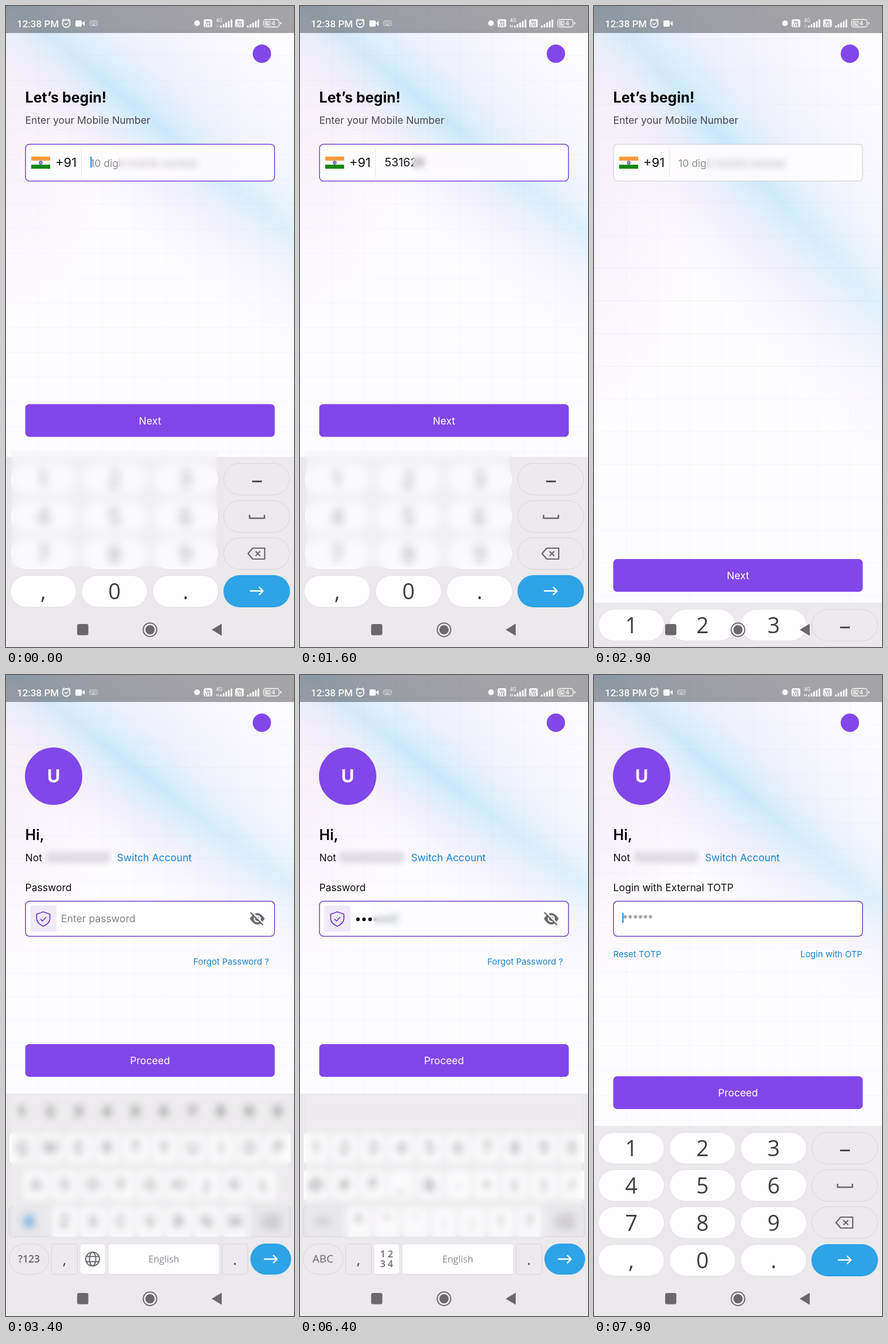
Recreate the animation shown at these times as an HTML page. Size 502x1115 px, loop 8 s.

```html
<!DOCTYPE html>
<html lang="en">
<head>
<meta charset="utf-8">
<title>Sign in</title>
<style>
  html, body { margin: 0; width: 100%; height: 100%; overflow: hidden; background: #fdfcff; }
  #stage { position: relative; width: 502px; height: 1115px; overflow: hidden; background: #fdfcff; }
  #stage > * { position: absolute; left: 0; top: 0; }
  #bg {
    width: 502px; height: 784px; transform-origin: 0 0;
    background:
      repeating-linear-gradient(90deg, rgba(110,90,170,.045) 0 1px, transparent 1px 55.7px),
      repeating-linear-gradient(rgba(110,90,170,.045) 0 1px, transparent 1px 43px),
      linear-gradient(100deg, transparent 45%, rgba(253,252,255,.55) 100%),
      radial-gradient(190px 330px at 0 230px, rgba(246,238,248,.8), transparent),
      linear-gradient(39deg, #fdfcff 48%, #f8f6fe 54%, #f1effd 59%, #e0effc 62.5%, #c9e8fb 66.5%, #dceffc 70%, #f0f1fe 75%, #f6f5fe 83%, #fcfbff 93%);
  }
  .blur {
    -webkit-mask: linear-gradient(90deg, transparent, #000 5px calc(100% - 5px), transparent),
          linear-gradient(transparent, #000 5px calc(100% - 5px), transparent);
    -webkit-mask-composite: source-in;
    mask-composite: intersect;
  }
</style>
</head>
<body>
<div id="stage">
  <div id="bg"></div>
  <svg id="app" width="502" height="1115"></svg>
  <div id="veils"></div>
  <svg id="nav" width="502" height="1115"></svg>
</div>
<script>
const LOOP = 8000, STEP = 100;
const PURPLE = '#8247e8', LINK = '#1c84cf', INK = '#3f3d41', GREY = '#6b686c';
const INTER = 'Inter, sans-serif', KEYFONT = "'Open Sans', sans-serif";
const NUMBER = '5316280497', SECRET = 'kuy@4827';
const TYPED = [3900, 4400, 4800, 5200, 5600, 6000, 6400, 6700];
const $ = id => document.getElementById(id);

// time, keyboard top, button top, background height
const LAYOUT = [
  [0, 784, 692.5, 784], [2800, 860, 780, 880], [2900, 1038, 962, 1038],
  [3000, 1115, 982, 1068], [3200, 860, 780, 880], [3300, 728, 642, 728],
  [7800, 784, 698, 784]
];
const SIGNAL = [[1000, 1800], [3200, 3700], [6300, 6900], [7900, 8000]];
const within = (t, a, b) => t >= a && t < b;

const esc = s => s.replace(/&/g, '&amp;').replace(/</g, '&lt;');
const text = (x, y, s, size, fill, o = {}) =>
  `<text x="${x}" y="${y}" font-size="${size}" fill="${fill}" font-family="${o.font || INTER}"` +
  ` font-weight="${o.w || 400}" text-anchor="${o.a || 'start'}">${esc(s)}</text>`;
const rect = (x, y, w, h, r, fill, stroke = 'none', sw = 1) =>
  `<rect x="${x}" y="${y}" width="${w}" height="${h}" rx="${r}" fill="${fill}" stroke="${stroke}" stroke-width="${sw}"/>`;
const circle = (x, y, r, fill, stroke = 'none', sw = 1) =>
  `<circle cx="${x}" cy="${y}" r="${r}" fill="${fill}" stroke="${stroke}" stroke-width="${sw}"/>`;
const line = (d, stroke, sw = 2) =>
  `<path d="${d}" fill="none" stroke="${stroke}" stroke-width="${sw}" stroke-linejoin="round"/>`;
const fillPath = (d, fill) => `<path d="${d}" fill="${fill}"/>`;
const glyph = (x, y, s, size, w = 400, fill = INK) => text(x, y, s, size, fill, { font: KEYFONT, a: 'middle', w });

function statusBar(t) {
  const white = '#fafafa';
  const badge = x => rect(x, 23, 15, 14, 3, white) +
    text(x + 7.5, 29.5, 'Vo', 6.5, '#8b8b8e', { w: 700, a: 'middle' }) +
    text(x + 7.5, 35.5, 'LTE', 6, '#8b8b8e', { w: 700, a: 'middle' });
  const bars = x => [0, 1, 2, 3, 4].map(i => rect(x + i * 4.6, 34 - i * 2.6, 3, 3.5 + i * 2.6, 1, white)).join('');
  const busy = SIGNAL.some(([a, b]) => within(t, a, b)) ? 1 : .4;
  let s = rect(0, 0, 502, 47, 0, 'rgba(0,0,0,.35)') +
    text(19, 36.5, '12:38 PM', 17, white, { font: 'Roboto, sans-serif', w: 500 }) +
    circle(105, 30.5, 6.5, 'none', white, 1.8) +
    line('M97.5 26l4-4M112.5 26l-4-4M102 30l2.5 2.5 4-3.5', white, 1.6) +
    rect(121, 25, 11, 11, 2, white) + fillPath('M132 30l5-4v9z', white) +
    circle(333, 30, 5, white) + badge(344.5) +
    text(366, 28, '4G', 9, white, { font: 'Roboto, sans-serif' }) +
    `<g opacity="${busy}">` + line('M367 37v-4M370 33v4', white, 1.4) + '</g>' +
    bars(373) + badge(399.5) + bars(420) +
    rect(449, 23.5, 27, 13, 4, 'none', white, 1.4) + rect(451, 25.5, 6, 9, 2, 'rgba(255,255,255,.55)') +
    rect(478, 28, 2, 4, 1, white) + text(462.5, 34, '24', 11, white, { a: 'middle', w: 500 });
  if (!within(t, 2800, 3300)) {
    s += `<g opacity=".8">` + rect(146, 26, 13, 8, 1.5, 'none', white, 1) +
      line('M148 28.5h9M148 30.5h9', white, 1).replace('/>', ' stroke-dasharray="1.4 1"/>') +
      line('M150 32.3h5', white, 1) + '</g>';
  }
  return s;
}

const caret = (x, y, h) => rect(x, y, 2.6, h, 0, '#2f9bea');
const button = (y, label) => rect(33.5, y, 435, 57, 7, PURPLE) +
  text(251, y + 35, label, 17.6, '#fff', { a: 'middle' });

function phonePage(t, btn) {
  const focus = t < 2800;
  const count = focus ? Math.min(10, Math.max(0, Math.floor((t - 100) / 250))) : 0;
  return text(33.5, 168, 'Let’s begin!', 25, '#000', { w: 700 }) +
    text(33.5, 205, 'Enter your Mobile Number', 17.6, '#4b4951') +
    rect(34, 240.5, 434, 64, 7, 'rgba(254,253,255,.9)', focus ? '#7a42d6' : '#d9d7dd', 1.5) +
    rect(44, 262, 33, 7, 0, '#ff9a3d') + rect(44, 269, 33, 7, 0, '#fff') + rect(44, 276, 33, 7, 0, '#138808') +
    circle(60.5, 272.5, 2.8, '#8f9bd0', '#23388f', 1) +
    text(86, 280, '+91', 22, '#111') + rect(131, 248, 1, 50, 0, '#e6e4ea') +
    (focus && !count ? caret(147, 262, 19) : '') +
    (count ? text(147.5, 279, NUMBER.slice(0, count), 20, '#151417')
           : text(147, 279.5, '10 digit mobile number', 17.6, '#8f8d93')) +
    button(btn, 'Next');
}

const greeting = () => circle(83, 176, 50, PURPLE) +
  text(83, 187, 'U', 31, '#fff', { w: 700, a: 'middle' }) +
  text(33.5, 287, 'Hi,', 25, '#000', { w: 600 }) +
  text(33.5, 324, 'Not', 17.6, '#111') +
  `<g filter="url(#soft)">${rect(70, 307, 111, 20, 4, '#dfdde3')}</g>` +
  text(193.5, 324, 'Switch Account', 17.6, LINK);
const field = () => rect(34, 393.5, 434, 61, 7, '#fefdff', '#6f43c4', 1.5);

function passwordPage(t, btn) {
  const count = TYPED.filter(s => t >= s).length;
  const open = count && t < TYPED[count - 1] + 300;
  const dots = open ? count - 1 : count;
  let entry = '';
  for (let i = 0; i < dots; i++) entry += circle(101 + i * 10.6, 425, 3.2, '#111');
  const end = 95.5 + dots * 10.6;
  if (open) entry += text(end, 430, SECRET[count - 1], 17.6, '#111', { font: 'Roboto, sans-serif' });
  if (open) entry += `<g opacity=".45">${caret(end + 10, 413, 20)}</g>`;
  return greeting() + text(33.5, 376, 'Password', 17.5, '#111') + field() +
    rect(42, 401, 46, 46, 4, '#f0eafb') +
    line('M65 412l11.5 4v8c0 6-5 10-11.5 13c-6.500-3-11.500-7-11.500-13v-8z', '#7339cf', 1.8) +
    line('M60 424.500l3.700 3.500 6.500-7', '#7339cf', 1.8) +
    (count ? entry : text(96, 430, 'Enter password', 17.6, '#85838a')) +
    fillPath('M425 424q13-20 26 0q-13 20-26 0z', '#6a686c') + circle(438, 424, 5, '#6a686c', '#fefdff', 2.4) +
    line('M427.500 411.500l22 22', '#fefdff', 3) + line('M426 413l22 22', '#6a686c', 2.4) +
    text(458.5, 504, 'Forgot Password ?', 15.1, LINK, { a: 'end' }) + button(btn, 'Proceed');
}

const totpPage = (t, btn) => greeting() + text(33.5, 376, 'Login with External TOTP', 17.6, '#111') + field() +
  text(50, 430, '******', 17.6, '#85838a') + (t >= 7900 ? caret(49, 414, 17) : '') +
  text(33.5, 491, 'Reset TOTP', 15.1, LINK) +
  text(468, 491, 'Login with OTP', 15.1, LINK, { a: 'end' }) + button(btn, 'Proceed');

const panel = top => rect(0, top, 502, 420, 0, '#ebe9eb');
const key = (x, y, w, h, r, fill) =>
  rect(x + .5, y + .5, w - 1, h - 1, r, fill, fill === '#fefdff' ? '#e1dfe3' : '#d5d3d6');
const arrow = (x, y) => line(`M${x - 12} ${y}h23M${x + 4} ${y - 7}l7 7-7 7`, '#fff', 2.4);
const erase = (x, y) => line(`M${x - 15} ${y}l8-9.500h21v19h-21z`, GREY, 2.2) +
  line(`M${x - 2} ${y - 4}l8 8m0-8l-8 8`, GREY, 2.2);

function keypad(t) {
  const at = t < 2600 && t >= 350 && t % 250 < STEP ? NUMBER[Math.floor((t - 350) / 250)] : '';
  let s = panel(784);
  ['123', '456', '789', ',0.'].forEach((row, j) => {
    const y = [795, 860, 924.5, 990][j];
    [...row].forEach((c, i) => {
      s += key(7 + i * 124, y, 116, 56, 28, c === at ? '#dedce0' : '#fefdff') + glyph(65 + i * 124, y + 42, c, 38);
    });
    s += j < 3 ? key(379, y, 116, 56, 28, '#ebe9ec') : rect(379, y, 116, 56, 28, '#2ea3e6');
  });
  return s + line('M429 827h17', INK, 2.8) + line('M424.500 885v6h26v-6', GREY, 2.6) + erase(437, 952.5) + arrow(437, 1017.5);
}

function keyboard(symbols) {
  const rows = symbols ? ['1234567890', '@#₹_&-+()/', '*"\':;!?'] : ['QWERTYUIOP', 'ASDFGHJKL', 'ZXCVBNM'];
  const pitch = 49.6, tall = 54;
  let s = panel(728);
  rows.forEach((row, j) => {
    const y = 796 + j * 64, left = 5 + (10 - row.length) / 2 * pitch;
    [...row].forEach((c, i) => {
      s += key(left + i * pitch, y, 45.5, tall, 5, '#fefdff') + glyph(left + i * pitch + 22.7, y + 36, c, 28);
    });
  });
  if (!symbols) [...'1234567890'].forEach((c, i) => { s += glyph(27 + i * pitch, 767, c, 24, 700); });
  s += key(5, 924, 70.5, tall, 5, '#e5e3e6') + key(426, 924, 71, tall, 5, '#e5e3e6') + erase(461, 951) +
    (symbols ? glyph(40, 957, '=\\<', 18, 600, GREY) : fillPath('M40 938l12 13h-6v10h-12v-10h-6z', '#3d8fe0'));
  const y = 989;
  s += key(5, y, 70.5, tall, 27, '#ebe9ec') +
    (symbols ? glyph(40, 1022, 'ABC', 19, 500, GREY) : glyph(40, 1022, '?123', 17.5, 600, GREY)) +
    key(79, y, 46, tall, 5, '#ebe9ec') + glyph(102, 1026, ',', 24) +
    key(128.5, y, 45.5, tall, 5, '#fefdff') +
    key(177.5, y, 195, tall, 5, '#fefdff') + glyph(275, 1022, 'English', 16.2, 400, '#8d8b8f') +
    key(376, y, 46, tall, 5, '#ebe9ec') + glyph(399, 1026, '.', 24) +
    rect(426, y, 71, tall, 27, '#2ea3e6') + arrow(461.5, 1016);
  return s + (symbols
    ? glyph(151, 1013, '1 2', 16, 600, GREY) + glyph(151, 1030, '3 4', 16, 600, GREY)
    : circle(151, 1016, 12, 'none', GREY, 2) +
      `<ellipse cx="151" cy="1016" rx="5.500" ry="12" fill="none" stroke="${GREY}" stroke-width="2"/>` +
      line('M140 1011.500h22M140 1020.500h22', GREY, 2));
}

function veil(x, y, w, h, radius, wash) {
  const el = document.createElement('div');
  el.className = 'blur';
  el.style.cssText = `position:absolute;left:${x}px;top:${y}px;width:${w}px;height:${h}px;` +
    `backdrop-filter:blur(${radius}px);background:${wash}`;
  $('stage').insertBefore(el, $('nav'));
  return el;
}
const veils = [
  [veil(194, 245, 256, 53, 6, 'rgba(250,249,252,.3)'), t => t < 3000],
  [veil(7, 771, 363, 208, 8, 'rgba(246,245,247,.5)'), t => t < 2800],
  [veil(7, 727, 488, 252, 7, 'rgba(243,242,244,.25)'), t => within(t, 3300, 7100)],
  [veil(126, 399, 292, 49, 6, 'rgba(253,252,255,.4)'), t => within(t, 3700, 7100)]
];
$('veils').remove();

const SOFT = '<defs><filter id="soft" x="-20%" y="-60%" width="140%" height="220%"><feGaussianBlur stdDeviation="5"/></filter></defs>';
$('nav').innerHTML = rect(124, 1075, 19.5, 19.5, 3, GREY) +
  circle(251, 1085, 11.8, 'none', GREY, 2) + circle(251, 1085, 8, GREY) +
  fillPath('M358.500 1085l17.500-10.500v21z', GREY);

function render(t) {
  const [, top, btn, height] = LAYOUT.filter(row => t >= row[0]).pop();
  const page = t < 3000 ? phonePage : t < 7800 ? passwordPage : totpPage;
  const pad = page !== passwordPage;
  const symbols = within(t, 4800, 5600) || t >= 6300;
  $('bg').style.transform = `scaleY(${height / 784})`;
  $('app').innerHTML = SOFT + statusBar(t) + circle(446, 83, 16, PURPLE) + page(t, btn) +
    `<g transform="translate(0 ${top - (pad ? 784 : 728)})">${pad ? keypad(t) : keyboard(symbols)}</g>`;
  for (const [el, shown] of veils) el.style.display = shown(t) ? 'block' : 'none';
}

const start = performance.now();
let last = -1;
function tick() {
  const t = Math.floor((performance.now() - start) % LOOP / STEP) * STEP;
  if (t !== last) render(last = t);
  requestAnimationFrame(tick);
}
tick();
</script>
</body>
</html>
```
